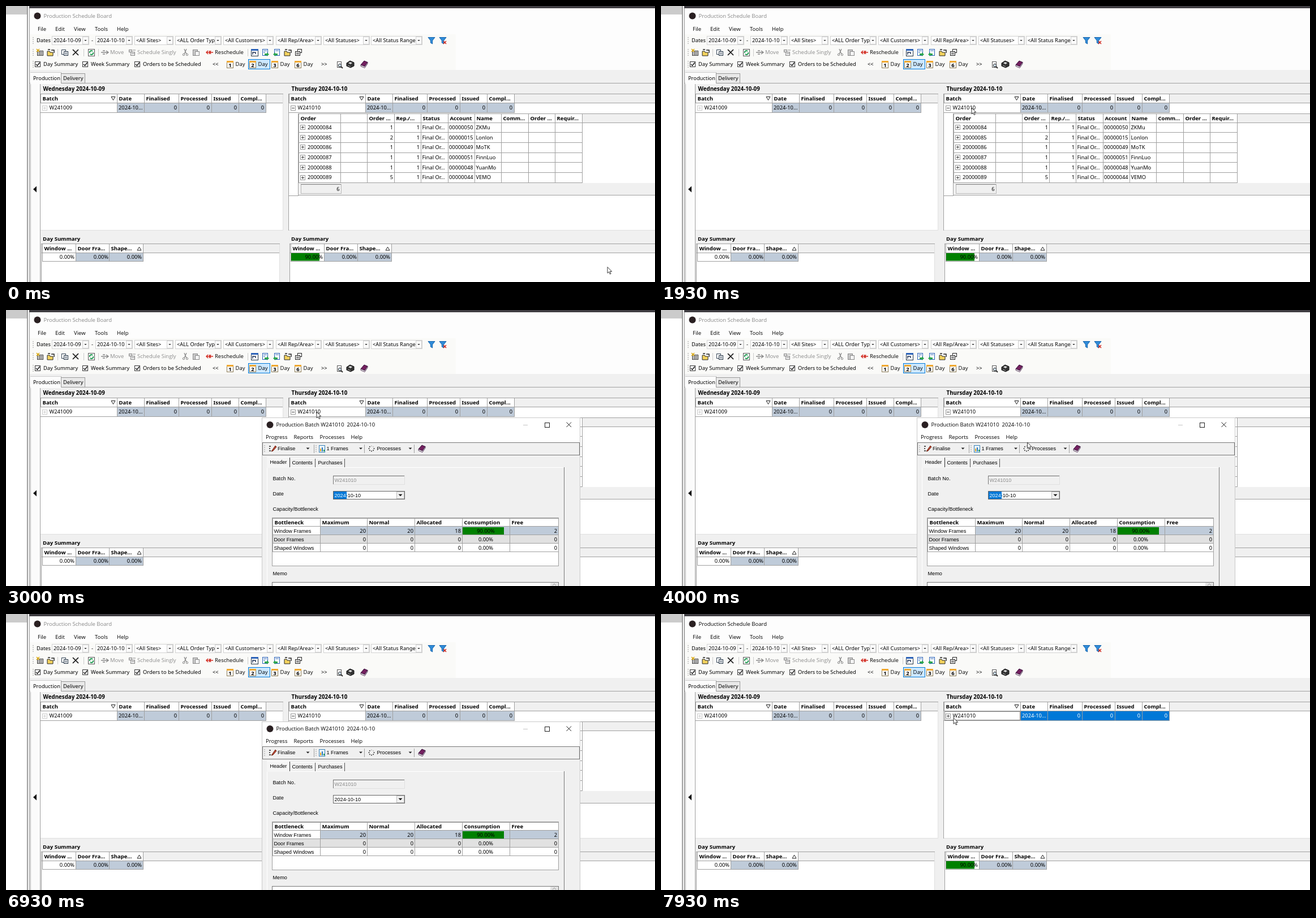
These frames come from a looping animation (1147x488 px, 8 s). An HTML page:

```html
<!DOCTYPE html>
<html lang="en">
<head>
<meta charset="utf-8">
<title>Production Schedule Board</title>
<style>
html, body { margin: 0; width: 100%; height: 100%; overflow: hidden; background: #fff; }
svg { display: block; width: 100%; height: 100%; }
text { font: 9.3px "Noto Sans", "Open Sans", sans-serif; fill: #000; white-space: pre; }
text.b { font-size: 9.5px; font-weight: 700; }
text.day { font-size: 9.75px; font-weight: 700; }
text.ui { font: 9.5px "Open Sans", "Noto Sans", sans-serif; }
text.s { font: 9.1px "Liberation Sans", Arial, sans-serif; }
text.r { text-anchor: end; }
text.m { text-anchor: middle; }
text.dim { fill: #8c8c8c; }
text.w { fill: #fff; }
</style>
</head>
<body>
<svg id="stage" viewBox="0 0 1147 488" preserveAspectRatio="none"></svg>
<script>
const FACE = '#f0f0f0', LINE = '#a0a0a0', CELL = '#bfcbd9', BLUE = '#0078d7', GREEN = '#008000';

// Drawing helpers; text is placed by its vertical centre.
const text = (x, y, s, cls = '') =>
  `<text x="${x}" y="${y + 3.4}" class="${cls}">${s.replace(/</g, '&lt;')}</text>`;
const fill = (x, y, w, h, color) => `<rect x="${x}" y="${y}" width="${w}" height="${h}" fill="${color}"/>`;
const box = (x, y, w, h, color, line = LINE) =>
  `<rect x="${x + .5}" y="${y + .5}" width="${w - 1}" height="${h - 1}" fill="${color}" stroke="${line}"/>`;
const path = (d, line = 'none', color = 'none', width = 1) =>
  `<path d="${d}" stroke="${line}" fill="${color}" stroke-width="${width}"/>`;
const hline = (x1, x2, y, c = LINE) => fill(x1, y, x2 - x1, 1, c);
const vline = (x, y1, y2, c = LINE) => fill(x, y1, 1, y2 - y1, c);
const sunken = (x, y, w, h) => box(x, y, w, h, '#fff', '#e0e0e0') + hline(x, x + w, y) + vline(x, y, y + h);
const group = (id, s) => `<g id="${id}">${s}</g>`;
const at = (x, y, s) => `<g transform="translate(${x} ${y})">${s}</g>`;
const arrow = (x, y, r = 2.5, c = '#222') => path(`M${x - r} ${y - r / 2}h${2 * r}l${-r} ${r}z`, 'none', c);
const dot = (x, y, r, c) => `<circle cx="${x}" cy="${y}" r="${r}" fill="${c}"/>`;
const grip = (x, y) => path(`M${x} ${y - 6}v13`, '#999', 'none', 1.2).replace('/>', ' stroke-dasharray="1.5 2"/>');
const expander = (x, y, open, line = '#999', sign = '#444') =>
  box(x - 4, y - 4, 9, 9, '#fff', line) + hline(x - 2, x + 3, y, sign) + (open ? '' : vline(x, y - 2, y + 3, sign));

// Header cells along column edges.
const header = (edges, y, h, labels) => edges.slice(0, -1).map((x, i) =>
  box(x, y, edges[i + 1] - x + 1, h, '#fff') + text(x + 3.5, y + h / 2, labels[i], 'b')).join('');

// Icons, each centred on the origin.
const sheet = c => box(-4, -5, 8, 11, '#fff', c);
const icons = {
  grid: box(-5, -3, 11, 9, '#fff', '#333') + path('M-5 0H5M-5 3H5M-1 -3V6M2 -3V6', '#555') + path('M-6 -6l5 5M-1 -6l-5 5', '#d9a400', 'none', 1.5),
  folder: path('M-6 6V-2h4l1 2h5v6z', '#222', '#f4d35e') + path('M-5 -5h4M1 -4h5v5', '#222', 'none', 1.4),
  copy: box(-6, -5, 8, 9, '#fff', '#345') + box(-2, -2, 8, 8, '#fff', '#234') + path('M0 1h4M0 3h4', '#456'),
  cross: path('M-5 -5L5 5M5 -5L-5 5', '#111', 'none', 1.7),
  refresh: box(-6, -6, 12, 13, '#fff', '#555') + path('M-3 1a3 3 0 0 1 5 -3M3 0a3 3 0 0 1 -5 3', '#159447', 'none', 1.8),
  move: path('M-7 0H5M2 -3l4 3l-4 3M-4 -3h4M-4 3h4', '#888', 'none', 1.4),
  single: box(-6, -5, 6, 5, '#ddd', '#888') + box(-3, -1, 8, 7, '#eee', '#888') + path('M-1 2h5M1 -4h5', '#888'),
  cut: path('M-2 -6L2 3M2 -6L-2 3', '#888', 'none', 1.3) + '<g fill="none" stroke="#888"><circle cx="-3" cy="4" r="1.7"/><circle cx="3" cy="4" r="1.7"/></g>',
  paste: box(-6, -5, 9, 11, '#ccc', '#888') + box(-2, -2, 8, 8, '#f4f4f4', '#888'),
  back: path('M6 0H-6M-3 -3l-3 3l3 3M-1 -3l3 6M2 -3l-3 6', '#d22b20', 'none', 1.4),
  board: box(-6, -6, 13, 13, '#fff', '#234') + fill(-6, -6, 13, 3, '#2b62b8') + path('M-3 -1v5M-3 0h5v3', '#235', 'none', 1.4),
  out: box(-6, -6, 10, 12, '#fff', '#2b62b8') + path('M-4 -3h6M-4 0h3', '#2b62b8') + path('M-2 2h4v-2l4 3.500l-4 3.500v-2h-4z', 'none', '#2fa84f'),
  into: box(-4, -6, 10, 12, '#fff', '#2b62b8') + path('M-2 -3h6', '#2b62b8') + path('M2 2h-4v-2l-4 3.500l4 3.500v-2h4z', 'none', '#2fa84f'),
  props: box(-2, -6, 8, 7, '#fff', '#222') + box(-6, -2, 9, 8, '#fff', '#222') + path('M-4 1h5M-4 3h5', '#333'),
  preview: sheet('#555') + path('M2 3l4 4', '#333', 'none', 2) + '<circle cx="1" cy="2" r="2.700" fill="#cde" stroke="#333"/>',
  printer: path('M-6 -2L0 -6L7 -3V3L1 6L-6 3z', '#111', '#333') + path('M-3 -2L0 -4L4 -2.500L1 0z', 'none', '#ddd') + path('M-4 2l5 2', '#aaa'),
  book: path('M-6 1L0 -6L6 -3.500L1 4z', '#35103a', '#74205f') + path('M-6 1L1 4L6 -3.500V-1L1 6.500L-6 3.500z', '#35103a', '#eee', .8),
  funnel: path('M-6 -5.500H6L1.700 0V6L-1.700 4V0z', '#1765ad', '#2f8bd8'),
  pen: path('M-6 -4h3M-6 0h2M-6 4h3', '#222', 'none', 1.6) + path('M-2 5L5 -5L7 -3L1 4z', '#621', '#c44835'),
  chart: box(-5, -6, 11, 13, '#e9f3fc', '#3b83b5') + fill(-3, 0, 2, 5, '#e7a321') + fill(0, -2, 2, 7, '#2c78bf') + fill(3, 2, 2, 3, '#2fa84f')
};
const icon = (name, x, y) => at(x, y, icons[name]);
const dayIcon = (n, x) => box(x - 6, 97, 12, 13, '#fff', '#8a7a55') + fill(x - 6, 97, 12, 3, '#f0a830') + text(x, 105, n, 'm b');
const appIcon = (x, y) => dot(x, y, 6, '#2a2022');

function combo(x, w, label) {
  return box(x, 53, w, 16, '#fff', '#d2d2d2') +
    `<svg x="${x + 2}" y="53" width="${w - 14}" height="16">${text(1, 8, label)}</svg>` +
    box(x + w - 12, 54, 11, 14, '#fafafa', '#cfcfcf') + arrow(x + w - 6.5, 61, 2.2);
}

function toolbars() {
  const combos = [[81, 66, '2024-10-09'], [158, 66, '2024-10-10'], [227, 69, '<All Sites>'], [299, 82, '<ALL Order Type>'],
    [384, 89, '<All Customers>'], [477, 81, '<All Rep/Area>'], [561, 82, '<All Statuses>'], [645, 91, '<All Status Ranges>']];
  const row2 = { grid: 60, folder: 79, copy: 104, cross: 123, refresh: 151, move: 175, single: 223, cut: 317,
    paste: 336, back: 360, board: 439, out: 459, into: 478, props: 517 };
  let s = fill(42, 50, 753, 63, '#fafaf8');
  s += ['File', 'Edit', 'View', 'Tools', 'Help'].map((m, i) => text([56, 87, 120, 157, 196][i], 41, m, 'ui')).join('');
  s += [61, 82, 103].map(y => grip(48, y)).join('') + text(54, 61, 'Dates') + text(151, 61, '-');
  s += combos.map(c => combo(...c)).join('') + icon('funnel', 752, 61) + icon('funnel', 772, 61) +
    path('M773 62l5 5M778 62l-5 5', '#d22b20', 'none', 1.6);
  for (const name in row2) s += icon(name, row2[name], 82);
  s += icon('folder', 498, 82) + [91, 137, 163, 427].map(x => vline(x, 76, 89, '#ccc')).join('');
  s += text(184, 82, 'Move', 'ui dim') + text(232, 82, 'Schedule Singly', 'ui dim') + text(369, 82, 'Reschedule', 'ui');
  [[51, 'Day Summary'], [135, 'Week Summary'], [227, 'Orders to be Scheduled']].forEach(([x, label]) =>
    s += box(x, 98, 10, 10, '#fff', '#333') + path(`M${x + 2} 103l2.500 2.500l4 -5.500`, '#111', 'none', 1.4) + text(x + 15, 103, label));
  s += box(428, 94, 39, 18, '#cce8ff', BLUE);
  [['1', 396], ['2', 436], ['3', 475], ['6', 516]].forEach(([n, x]) => s += dayIcon(n, x) + text(x + 9.5, 103, 'Day', 'ui'));
  return s + text(365, 103, '<<') + text(557, 103, '>>') + icon('preview', 589, 103) + icon('printer', 608, 103) + icon('book', 633, 103);
}

const batchCols = [61, 196, 244, 305, 363, 411, 459];
function batchRow(batch, selected) {
  const cls = selected ? ' w' : '';
  let s = fill(61, 172, 135, 16, '#fff');
  for (let i = 1; i < 6; i++) {
    const x = batchCols[i], end = batchCols[i + 1];
    s += box(x, 171, end - x + 1, 18, selected ? BLUE : CELL);
    s += i === 1 ? text(x + 3, 180, '2024-10...', cls) : text(end - 3, 180, '0', 'r' + cls);
  }
  s += hline(61, 196, 188) + text(76.5, 180, batch);
  return selected ? s + '<rect x="62.500" y="172.500" width="133" height="15" fill="none" stroke="#111" stroke-dasharray="1 1"/>' : s;
}

function dayPane(title, batch, right) {
  return fill(61, 138, right - 61, 17, FACE) + text(65.5, 147, title, 'day') +
    sunken(60, 155, right - 60, 242) + fill(61, 156, right - 62, 15, FACE) + hline(61, right - 1, 171) +
    header(batchCols, 155, 17, ['Batch', 'Date', 'Finalised', 'Processed', 'Issued', 'Compl...']) +
    path('M186 160.500h7l-3.500 6z', '#222') + batchRow(batch, false);
}

function summary(value, right) {
  const load = parseFloat(value) / 100;
  return fill(61, 398, right - 61, 90, FACE) + text(65, 412, 'Day Summary', 'b') + sunken(62, 420, right - 62, 70) +
    fill(63, 421, right - 64, 15, FACE) + hline(63, right - 1, 436) +
    header([64, 123, 182, 242], 420, 17, ['Window ...', 'Door Fra...', 'Shape...']) + path('M232 432h7l-3.500 -6z', '#222') +
    box(64, 436, 60, 16, '#fff') + fill(65, 437, 55.5 * load, 13.5, GREEN) + box(123, 436, 60, 16, CELL) + box(182, 436, 61, 16, CELL) +
    [value, '0.00%', '0.00%'].map((v, i) => text([121, 181, 240][i], 443.5, v, 'r')).join('');
}

const orders = [['20000084', 1, '00000050', 'ZKMu'], ['20000085', 2, '00000015', 'Lonlon'], ['20000086', 1, '00000049', 'MoTK'],
  ['20000087', 1, '00000051', 'FinnLuo'], ['20000088', 1, '00000048', 'YuanMo'], ['20000089', 5, '00000044', 'VEMO']];
function orderGrid() {
  const cols = [517, 591, 638, 686, 733, 781, 828, 875, 923, 970, 1018];
  let s = fill(517, 190, 630, 17, FACE) + hline(517, 1147, 190) + hline(517, 1147, 206) + vline(516, 190, 335) + hline(500, 517, 335) +
    header(cols, 190, 17, ['Order', '', 'Order ...', 'Rep./...', 'Status', 'Account', 'Name', 'Comm...', 'Order ...', 'Requir...']);
  orders.forEach(([order, count, account, name], i) => {
    const mid = 214.5 + i * 17.7;
    s += hline(517, 1019, Math.round(205.500 + (i + 1) * 17.7)) + expander(524, Math.floor(mid), false) + text(533, mid, order) +
      text(684, mid, '' + count, 'r') + text(731, mid, '1', 'r') + text(735.5, mid, 'Final Or...') + text(783, mid, account) + text(830.5, mid, name);
  });
  s += cols.map(x => vline(x, 206, 312)).join('');
  return s + fill(517, 313, 630, 21, FACE) + hline(517, 1147, 334) + box(521, 315, 72, 17, FACE, '#b8b8b8') +
    hline(521, 592, 315, '#777') + text(589.5, 323.5, '6', 'r');
}

function mainWindow() {
  return fill(0, 0, 37, 15, '#cbcbcb') + fill(37, 0, 5, 488, '#f3f3f3') + fill(37, 0, 1.5, 488, '#858585') +
    fill(41, 0, 1106, 4, '#403e43') + fill(42, 4, 1105, 109, '#fdfdfd') + group('edge', vline(41, 4, 488, '#777')) + appIcon(55.5, 17.5) +
    group('title', text(66.5, 17.5, 'Production Schedule Board', 'ui')) + toolbars() +
    fill(42, 113, 1105, 375, FACE) + hline(42, 1147, 136) + box(97, 119, 43, 18, '#e9e9e9', '#999') + text(101, 128, 'Delivery') +
    fill(43, 117, 55, 21, '#fcfcfc') + vline(97, 117, 137, '#999') + hline(43, 98, 117, '#ccc') + text(48, 127.5, 'Production') +
    fill(43, 138, 17, 350, '#fbfbfb') + vline(43, 138, 488, '#bbb') + vline(60, 138, 488) + path('M54 318.500v11l-6 -5.500z', 'none', '#111') +
    dayPane('Wednesday 2024-10-09', 'W241009', 490) + expander(68, 180, false, '#ccc', '#ccc') + summary('0.00%', 484) +
    at(439, 0, dayPane('Thursday 2024-10-10', 'W241010', 712) + group('selected', batchRow('W241010', true)) + summary('90.00%', 712)) +
    group('collapsed', expander(507, 180, false)) + group('expanded', expander(507, 180, true) + orderGrid());
}

function capacityTable() {
  const cols = [471, 555, 638, 722, 806, 890, 976];
  const rows = [['Window Frames', 20, 20, 18, '90.00%', 2], ['Door Frames', 0, 0, 0, '0.00%', 0], ['Shaped Windows', 0, 0, 0, '0.00%', 0]];
  let s = box(470, 367, 507, 86, '#fff') + header(cols, 368, 15, ['Bottleneck', 'Maximum', 'Normal', 'Allocated', 'Consumption', 'Free']);
  rows.forEach((row, i) => {
    const y = 383 + i * 15;
    row.forEach((v, c) => {
      const x = cols[c], end = cols[c + 1];
      s += box(x, y - 1, end - x + 1, 16, i === 0 && c ? CELL : i === 1 ? '#e1e1e1' : '#fff');
      if (v === '90.00%') s += fill(807, y + 1, 73, 13, GREEN);
      s += c === 0 ? text(473.5, y + 7.5, v, 's') : c === 4 ? text(848, y + 7.5, v, 'm') : text(end - 2, y + 7.5, '' + v, 'r');
    });
  });
  return s;
}

function dialog() {
  return fill(452, 190, 563, 300, '#c9c9c9') + fill(453, 191, 561, 43, '#fff') + fill(453, 234, 561, 254, FACE) +
    appIcon(466.5, 203) + text(477.5, 203, 'Production Batch W241010  2024-10-10', 'ui') +
    hline(914, 922, 203, '#c4c4c4') + box(952, 199, 9, 9, '#fff', '#222') + path('M990.500 198.500l8.500 8.500M999 198.500l-8.500 8.500', '#222') +
    ['Progress', 'Reports', 'Processes', 'Help'].map((m, i) => text([459, 508.5, 554.5, 609.5][i], 225, m, 'ui')).join('') +
    box(453, 234, 561, 23, FACE, '#777') + grip(457, 245) + icon('pen', 471, 245) + text(480, 245, 'Finalise', 's') + arrow(533.5, 245, 3) +
    vline(544, 238, 253) + grip(548, 245) + icon('chart', 558, 245) + text(566.5, 245, '1 Frames', 's') + arrow(627, 245, 3) + vline(633, 238, 253) +
    [0, 1, 2, 3, 4, 5, 6, 7].map(i => dot(646 + 4.5 * Math.cos(i * Math.PI / 4), 245 + 4.5 * Math.sin(i * Math.PI / 4), 1, i > 5 ? '#bbb' : '#333')).join('') +
    text(655.5, 245, 'Processes', 's') + arrow(714.5, 245, 3) + vline(721, 238, 253) + icon('book', 735, 245) +
    hline(461, 986, 278, '#fff') + vline(461, 261, 488, '#fff') + vline(986, 278, 488, '#777') +
    [[502, 44, 'Contents'], [548, 50, 'Purchases']].map(([x, w, label]) => hline(x, x + w, 262, '#fff') + vline(x + w, 263, 278, '#555') + text(x + 3.5, 270, label, 's')).join('') +
    fill(461, 260, 41, 19, '#f5f5f5') + hline(461, 501, 260, '#fff') + vline(501, 261, 278, '#333') + text(466.5, 269, 'Header', 's') +
    text(471.5, 298, 'Batch No.', 's') + box(578, 292, 127, 17, FACE, '#e0e0e0') + hline(578, 704, 293, '#777') + vline(578, 293, 308, '#777') + text(580.5, 300.5, 'W241010', 's dim') +
    text(471.5, 325, 'Date', 's') + box(578, 320, 127, 15, '#fff', '#666') + box(690, 321, 14, 13, FACE, '#bbb') + arrow(697, 327.5, 3.5, '#111') +
    text(580.5, 328, '2024-10-10', 's') + group('picked', fill(579, 321, 23, 13, BLUE) + text(580.5, 328, '2024', 's w')) +
    text(471.5, 352, 'Capacity/Bottleneck', 's') + capacityTable() + text(471.5, 466, 'Memo', 's') + box(470, 481, 507, 10, '#fff', '#777') + fill(962, 482, 14, 6, '#e3e3e3') +
    path('M966 487l3 -3l3 3', '#999');
}

const pointer = path('M0 0V10.800L2.500 8.500L4.300 12.600L6.100 11.800L4.300 7.900H7.700z', '#222', '#fff', .9);

const stage = document.getElementById('stage');
stage.innerHTML = mainWindow() + group('dialog', dialog()) + group('pointer', pointer);
const $ = id => document.getElementById(id);
const show = (id, on) => $(id).setAttribute('visibility', on ? 'visible' : 'hidden');

const LOOP = 8000, STEP = 200 / 3;
// Pointer stops: time, x, y.
const route = [[0, 1063, 461.5], [867, 548.5, 222.5], [1133, 530, 210], [1267, 530, 210], [1533, 580, 187], [1733, 549, 180], [3200, 549, 180],
  [3533, 627, 283], [3600, 627, 283], [3867, 604, 217], [4200, 727, 265], [4467, 690, 318], [4667, 742, 316], [5000, 610, 289],
  [5333, 530, 263], [5467, 533, 247], [6000, 932, 460], [7130, 925, 482], [7600, 508, 181], [7733, 527, 189], [7933, 517, 183.5]];

function pointerAt(t) {
  const i = route.findIndex(p => p[0] > t);
  if (i < 0) return route[route.length - 1].slice(1);
  const [t0, x0, y0] = route[i - 1], [t1, x1, y1] = route[i];
  const u = (t - t0) / (t1 - t0), e = u * u * (3 - 2 * u);
  return [x0 + (x1 - x0) * e, y0 + (y1 - y0) * e];
}

function render(time) {
  // The screen refreshes fifteen times a second.
  const t = Math.floor((time % LOOP) / STEP + .06) * STEP + .5;
  const open = t >= 2930 && t < 6990;
  const active = (t >= 2530 && t < 2930) || t >= 6990;
  const folded = t >= 7660;
  $('title').firstChild.style.fill = active ? '#000' : '#888';
  $('edge').setAttribute('opacity', active ? 1 : .7);
  show('selected', active);
  show('collapsed', folded);
  show('expanded', !folded);
  show('dialog', open);
  $('dialog').setAttribute('opacity', t < 2990 ? .6 : 1);
  show('picked', open && t < 6930);
  show('pointer', t < 5995 || t >= 7130);
  $('pointer').setAttribute('transform', `translate(${pointerAt(t).map(v => v.toFixed(1)).join(' ')})`);
}

const start = performance.now();
function tick() {
  render(performance.now() - start);
  requestAnimationFrame(tick);
}
tick();
</script>
</body>
</html>
```
